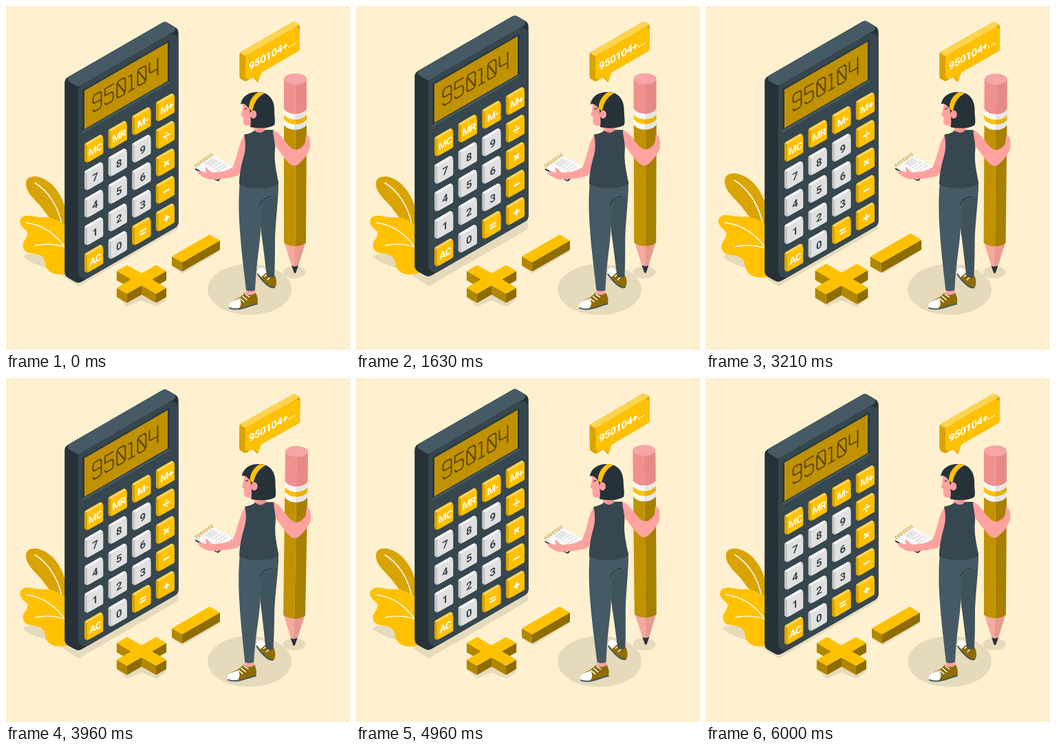
An HTML page with a canvas that plays this animation: 500 by 500 pixels, repeating every 6.04 s.

```html
<!DOCTYPE html>
<html lang="en">
<head>
<meta charset="utf-8">
<title>Calculator</title>
<style>
html, body { margin: 0; width: 100%; height: 100%; overflow: hidden; background: #fff1d0; }
canvas { display: block; width: 100%; height: 100%; }
</style>
</head>
<body>
<canvas id="stage"></canvas>
<script>
const canvas = document.getElementById('stage');
const ctx = canvas.getContext('2d');
const LOOP = 6040, CYCLE = 3000, SLOPE = 0.577;
const C = {
  bg: '#fff1d0', shade: '#e6dabc', gold: '#ffc100', light: '#ffd44d', side: '#d9a400',
  brown: '#b28700', deep: '#8f6c00', slate: '#455a64', dark: '#37474f', ink: '#263238',
  skin: '#ffa2a0', skinDark: '#f28f8f', white: '#ffffff'
};

// ---------- helpers ----------
function fill(d, color) {
  ctx.fillStyle = color;
  ctx.fill(new Path2D(d));
}

function line(d, color, width) {
  ctx.strokeStyle = color;
  ctx.lineWidth = width;
  ctx.lineCap = ctx.lineJoin = 'round';
  ctx.stroke(new Path2D(d));
}

function poly(pts, color, r = 0) {
  const n = pts.length, a = pts[n - 1], b = pts[0];
  ctx.beginPath();
  ctx.moveTo((a[0] + b[0]) / 2, (a[1] + b[1]) / 2);
  pts.forEach((p, i) => {
    const q = pts[(i + 1) % n];
    ctx.arcTo(p[0], p[1], q[0], q[1], r);
  });
  ctx.closePath();
  ctx.fillStyle = color;
  ctx.fill();
}

function ellipse(x, y, rx, ry, color) {
  ctx.beginPath();
  ctx.ellipse(x, y, rx, ry, 0, 0, Math.PI * 2);
  ctx.fillStyle = color;
  ctx.fill();
}

function group(draw, before) {
  ctx.save();
  before();
  draw();
  ctx.restore();
}

function scaleAt(x, y, s) {
  ctx.translate(x, y);
  ctx.scale(s, s);
  ctx.translate(-x, -y);
}

function rotateAt(x, y, a) {
  ctx.translate(x, y);
  ctx.rotate(a);
  ctx.translate(-x, -y);
}

const onWall = (x, y, draw) => group(draw, () => ctx.transform(1, -SLOPE, 0, 1, x, y));

function label(str, size, color, align, y, spacing = 0) {
  ctx.font = `bold ${size}px Roboto, "Open Sans", sans-serif`;
  ctx.letterSpacing = spacing + 'px';
  ctx.textAlign = align;
  ctx.textBaseline = 'alphabetic';
  ctx.fillStyle = color;
  ctx.fillText(str, 0, y);
}

// upright slab: face edge from (x, y) going right, depth pushed back to the upper left
function slab(x, y, w, h, dx, r, front, left, top) {
  const dy = dx * SLOPE, rise = w * SLOPE;
  const tl = [x, y], tr = [x + w, y - rise], br = [x + w, y - rise + h], bl = [x, y + h];
  const back = p => [p[0] - dx, p[1] - dy];
  poly([back(tl), back(tr), tr, br, bl, back(bl)], left, r);
  poly([back(tl), back(tr), tr, tl], top, r * 0.45);
  poly([tl, tr, br, bl], front, r);
}

// flat block lying on the floor, outline given in floor units
function block(cx, cy, shape, h) {
  const pts = shape.map(([p, q]) => [cx + (p + q) * 0.866, cy + (q - p) * 0.5]);
  const faces = [];
  shape.forEach(([p, q], i) => {
    const j = (i + 1) % shape.length, [p2, q2] = shape[j];
    const a = pts[i], b = pts[j];
    if (p === p2 && q2 < q) faces.push([a, b, C.brown]);
    if (q === q2 && p2 < p) faces.push([a, b, C.deep]);
  });
  faces.sort((m, n) => m[0][1] + m[1][1] - n[0][1] - n[1][1]);
  for (const [a, b, color] of faces)
    poly([a, b, [b[0], b[1] + h], [a[0], a[1] + h]], color, 0.8);
  poly(pts, C.gold, 1);
}

// ---------- motion ----------
const floatY = t => -10 * (1 - Math.abs((t % CYCLE) / (CYCLE / 2) - 1));

function swing(t) {
  const k = (t % CYCLE) / CYCLE;
  const v = k < 0.25 ? k * 4 : k < 0.75 ? 2 - k * 4 : k * 4 - 4;
  return v * Math.PI / 180;
}

function pulse(t) {
  const bump = (from, peak, to) =>
    t <= from || t >= to ? 0 : t < peak ? (t - from) / (peak - from) : (to - t) / (to - peak);
  return 1 + 0.1 * (bump(0, 480, 1430) + bump(2420, 2880, 3780));
}

// ---------- scenery ----------
function shadows() {
  ellipse(354, 412, 61, 37, C.shade);
  ellipse(419, 387, 16.5, 9, C.shade);
  poly([[78, 390], [106, 407.5], [250, 324], [250, 305]], C.shade, 4);
  fill('M25 364C32 356 70 356 92 372L94 390C70 384 34 376 25 364Z', C.shade);
  poly([[160, 421], [175, 437], [197, 428], [219, 437], [235, 426], [200, 405]], C.shade, 3);
  poly([[240, 378], [257, 389], [312, 356], [300, 345]], C.shade, 3);
}

function plant() {
  fill('M88 330C76 322 62 308 52 293C42 281 29 272 29 258C29 250 36 246.500 45 248C66 252 84 273 90 310Z', C.side);
  line('M42 257C60 268 76 290 81 318', C.white, 1.5);
  fill('M92 322C78 312 66 306 56 307C44 308 39 304 28 305C20 307 18 314 23 320C27 326 33 326 31 333C29 340 23 343 25 351C28 361 38 358 46 361C54 363 56 368 57 375C58 383 66 390 76 390C84 391 89 388 95 388Z', C.gold);
  line('M29 315C52 318 72 329 90 357M43 348C58 345 72 346 84 350', C.white, 1.3);
}

function plus() {
  const w = 8.7, l = 33;
  block(197, 397.3, [[-w, -l], [w, -l], [w, -w], [l, -w], [l, w], [w, w],
    [w, l], [-w, l], [-w, w], [-l, w], [-l, -w], [-w, -w]], 13.5);
}

function minus() {
  const w = 8.7, l = 31.7;
  block(276, 352.3, [[-l, -w], [l, -w], [l, w], [-l, w]], 13.5);
}

// ---------- calculator ----------
const LCD = {
  9: 'M6 0H-4L-6 -2V-9L-4 -12H4L6 -9V9L4 12H-4L-6 9',
  5: 'M6 -12H-6V-2H4L6 1V9L4 12H-4L-6 9',
  0: 'M-6 -9L-4 -12H4L6 -9V9L4 12H-4L-6 9ZM-5 -9L5 9',
  1: 'M-4 -10H0V12M-4 12H4',
  4: 'M-6 -12V1L-4 3H6M6 -12V12'
};
const KEYS = [
  ['MC', 'MR', 'M-', 'M+'],
  ['7', '8', '9', '÷'],
  ['4', '5', '6', '×'],
  ['1', '2', '3', '−'],
  ['AC', '0', '=', '+']
];
const SIGNS = {
  '÷': 'M-4 0H4M0 -4.2V-4M0 4V4.2',
  '×': 'M-2.6 -2.6L2.6 2.6M2.6 -2.6L-2.6 2.6',
  '−': 'M-3.5 0H3.5',
  '=': 'M-3.5 -2.3H3.5M-3.5 2.3H3.5',
  '+': 'M-3.5 0H3.5M0 -3.5V3.5'
};

function key(name, col, row) {
  const x = 118 + col * 34.6, y = 202.6 - col * 20 + row * 40;
  const gray = /^\d$/.test(name);
  if (gray) slab(x, y, 23.2, 25.4, 4, 2.6, '#e0e0e0', '#c4c4c4', '#f5f5f5');
  else slab(x, y, 23.2, 25.4, 4, 2.6, C.gold, C.side, C.light);
  onWall(x + 11.6, y + 6, () => {
    if (SIGNS[name]) line(SIGNS[name], C.white, 2.4);
    else if (gray) label(name, 15, C.dark, 'center', 5.3);
    else label(name, 14, C.white, 'center', 5, -0.9);
  });
}

function calculator() {
  slab(105, 117.6, 145.7, 286, 19.8, 10, C.dark, C.ink, C.slate);
  poly([[111, 122], [238, 49], [238, 112], [111, 185]], '#2b383f', 2);
  poly([[111, 182], [238, 108.7], [238, 112], [111, 185.3]], C.slate);
  poly([[114, 123], [235, 53.2], [235, 109], [114, 179]], '#c09100');
  [...'950104'].forEach((d, i) => {
    const x = [132.5, 149.8, 167.3, 182.5, 197.5, 214.5][i];
    onWall(x, 139 - (x - 132.5) * SLOPE, () => line(LCD[d], '#5f4800', 2));
  });
  KEYS.forEach((names, row) => names.forEach((name, col) => key(name, col, row)));
}

// ---------- speech bubble ----------
function bubble() {
  fill('M356 100L366 111L372 94Z', C.side);
  slab(348, 73, 79, 37, 8.7, 5, C.gold, C.side, C.light);
  fill('M358 100L367 109.5L371.5 94Z', C.gold);
  onWall(353, 94, () => label('950104+...', 15, C.white, 'left', 0, -0.5));
}

// ---------- woman with pencil ----------
function pencil() {
  fill('M404 342L418 386Q420 390 422 386L436 342Z', '#f5a9a0');
  fill('M420 342V388.5Q421 388.500 422 386L436 342Z', '#e99a92');
  fill('M415 377Q420 380 425 377L421.500 387Q420 390 418.500 387Z', C.ink);
  fill('M404 172H420.500V349Q410 349 404 344Z', '#c09200');
  fill('M420.500 172H437L436 344Q430 349 420.500 349Z', '#a88000');
  const band = (top, bottom, left, right) => {
    fill(`M404 ${top}Q410 ${top + 7} 420.500 ${top + 7}V${bottom + 7}Q410 ${bottom + 7} 404 ${bottom}Z`, left);
    fill(`M437 ${top}Q431 ${top + 7} 420.500 ${top + 7}V${bottom + 7}Q431 ${bottom + 7} 437 ${bottom}Z`, right);
  };
  band(150, 173, '#fafafa', '#e6e6e6');
  band(158, 165, C.gold, '#eab100');
  band(106, 150, '#f0908f', '#e68a89');
  ellipse(420.5, 106, 16.5, 8, '#f5a6a5');
}

function shoes() {
  // far foot
  fill('M379 388H390V397L380 396Z', C.skin);
  fill('M365 386C365 381 370 380 375 383L381 391L391 392C394 399 394 407 390 410C383 412 376 404 372 397Z', C.deep);
  fill('M365 387C365 381 370 379 375 382L379 387L371 394Z', C.white);
  line('M366 390C372 399 381 409 390 409', C.slate, 2);
  line('M376 393L381 389M380 398L385 393', C.white, 1.4);
  // near foot
  fill('M349 410H362L363 421L349 422Z', C.skin);
  fill('M324 433C328 427 340 426 347 417C351 421 358 421 363 417C366 423 367 429 365 433C354 436 344 442 331 441C324 441 322 437 324 433Z', C.deep);
  fill('M324 433C327 428 334 428 339 425C343 430 342 437 337 441C327 442 321 439 324 433Z', C.white);
  line('M325 439C338 444 351 436 365 433', C.slate, 2);
  line('M340 425L346 430M344 422L350 427M348 419L354 423', C.white, 1.5);
}

function legs() {
  fill('M360 256H396C396 282 392 310 391 337C391 356 391 376 390 393C386 396 382 395 379 392C376 368 374 350 371 330L367 286Z', '#3f535d');
  fill('M340 254H396L395 276L374 284C370 303 371 327 368 349C365 372 363 392 362 413Q355 416 349 413C346 386 342 356 340 326C338 300 338 274 340 254Z', C.slate);
  line('M386 277C377 278 371 282 369 290', C.ink, 1);
}

function notebook() {
  poly([[273, 237], [298, 219], [329, 235.5], [308, 255]], C.ink, 2);
  poly([[273, 234.5], [298, 216], [330, 233], [307, 253]], '#fafafa', 2);
  poly([[288, 229], [300, 221], [309, 226], [297, 234]], '#e6e6e6');
  line('M300 235L313 227M304 238L318 229M307 241L321 232', '#d2d2d2', 1);
  for (let i = 0; i < 7; i++) {
    const x = 276 + i * 3.7, y = 233 - i * 2.6;
    line(`M${x} ${y + 1}q-3 -4 0 -4q2.500 1 1.500 4`, C.brown, 0.8);
  }
}

function body() {
  fill('M352 186C344 187 341 197 338 208C335 219 332 229 329 235C320 240 309 242 300 242C295 240 293 235 290 234C289 237 291 240 291 242C286 241 281 239 278 240C279 245 287 250 296 252C309 252 326 250 336 247C343 242 346 228 351 214Z', C.skin);
  fill('M361 168L376 174L377 187Q368 191 360 186Z', C.skinDark);
  fill('M346 187C352 186 358 184 361 181Q369 188 377 180L389 180C388 188 392 196 391 208C389 228 394 242 396 258C384 267 352 267 339 259C339 246 341 236 344 224C347 214 350 204 346 187Z', C.dark);
}

function head() {
  fill('M345 141C344 148 344 152 342 157Q341 160 345 161C344 168 345 174 351 174C356 174 360 176 362 181L374 178L376 140Z', C.skin);
  fill('M341 143C343 131 353 125 366 125C382 125 390 136 390 151C390 162 392 168 390 173C380 179 366 178 355 176C357 168 355 158 354 150C350 145 346 140 341 143Z', C.ink);
  fill('M367 125L376 126.500C366 132 361 139 358 153L353 149C353 139 358 130 367 125Z', C.gold);
  ellipse(359.5, 157.5, 4.7, 6, C.skin);
  line('M358 155Q361 156 360 160', C.skinDark, 1);
  line('M347 150L350 149', C.ink, 1.3);
}

function arm() {
  fill('M388 180C398 184 403 194 410 202C415 207 418 209 423 209C430 206 433 202 435 198L436 187C441 187 443 196 442 206C439 215 432 224 425 230C420 234 414 232 409 226C402 218 396 209 391 203C391 195 388 188 388 180Z', C.skin);
  line('M427 209Q432 206 435 201', C.skinDark, 1);
}

function woman() {
  pencil();
  shoes();
  legs();
  notebook();
  body();
  head();
  arm();
}

// ---------- frame ----------
function draw(t) {
  const w = Math.round(innerWidth * devicePixelRatio), h = Math.round(innerHeight * devicePixelRatio);
  if (canvas.width !== w || canvas.height !== h) {
    canvas.width = w;
    canvas.height = h;
  }
  ctx.setTransform(w / 500, 0, 0, h / 500, 0, 0);
  ctx.fillStyle = C.bg;
  ctx.fillRect(0, 0, 500, 500);

  const s = pulse(t), a = swing(t);
  shadows();
  group(plant, () => scaleAt(57, 319, s));
  group(calculator, () => ctx.translate(0, floatY(t)));
  group(minus, () => scaleAt(276, 359, s));
  group(plus, () => scaleAt(197, 404, s));
  group(woman, () => rotateAt(357.5, 270, a));
  group(bubble, () => rotateAt(383.5, 67, a));
}

const start = performance.now();
function tick() {
  draw((performance.now() - start) % LOOP);
  requestAnimationFrame(tick);
}
tick();
</script>
</body>
</html>
```
